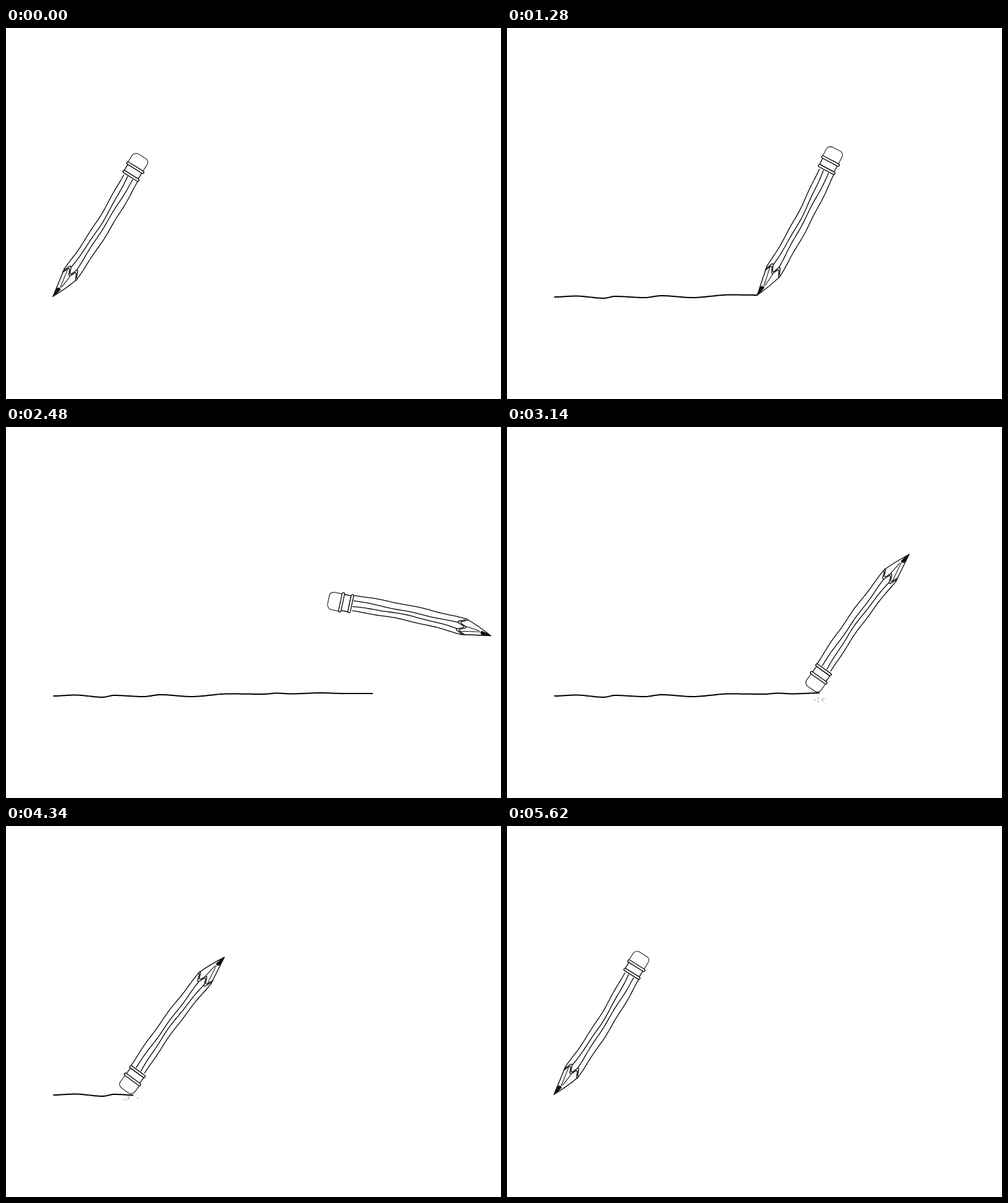
These frames come from a looping animation (800 px wide and 600 px high, 6 s). An HTML page with a canvas:

```html
<!DOCTYPE html>
<html lang="en">
<head>
<meta charset="utf-8">
<title>Pencil and eraser</title>
<style>
html, body { margin: 0; width: 100%; height: 100%; overflow: hidden; background: #fff; }
canvas { display: block; width: 800px; height: 600px; }
</style>
</head>
<body>
<canvas id="stage" width="800" height="600"></canvas>
<script>
const ctx = document.getElementById('stage').getContext('2d');
const LOOP = 6000, STEP = 20, RAD = Math.PI / 180;
const HALF = 132.4;                       // from the tip to the pencil's middle
const HOME = { x: 146.2, y: 321.7 };      // middle of the resting pencil

// Phases of the loop, in ms
const BRAKE = 1943, DRAWN = 2080;
const FLIP = 2210, FLIPPED = 2685;
const ERASE = 2790, TURN = 4823, CLEARED = 4860, DONE = 5240;

const clamp = u => Math.min(1, Math.max(0, u));
const mix = (a, b, u) => a + (b - a) * u;
const smooth = u => u * u * (3 - 2 * u);
const ease = (t, from, to) => smooth(clamp((t - from) / (to - from)));
const noise = n => {
  const v = Math.sin(n * 127.1) * 43758.5453;
  return v - Math.floor(v);
};

// --- motion: middle of the pencil and its tilt in degrees ---

// A steady stroke that brakes at its end.
function tipX(t) {
  const speed = 0.2566, d = clamp((t - BRAKE) / (DRAWN - BRAKE)) * (DRAWN - BRAKE);
  return 76 + speed * (Math.min(t, BRAKE) + d - d * d / (2 * (DRAWN - BRAKE)));
}

function drawPose(t) {
  const s = Math.min(t, DRAWN), angle = 32 - 0.0031 * s, r = angle * RAD;
  return {
    x: tipX(t) + HALF * Math.sin(r),
    y: 434 - 0.0016 * s - HALF * Math.cos(r),
    angle
  };
}

const sway = t => Math.sin(Math.PI * clamp((t - ERASE) / (TURN - ERASE)));

function erasePose(t) {
  const d = Math.min(Math.max(t, ERASE), CLEARED) - ERASE;
  return {
    x: 656.9 - 0.2394 * d - 4.8e-6 * d * d,
    y: 309 + 0.0034 * d + 7 * sway(t),
    angle: -146.4 + 4 * sway(t)
  };
}

function pose(t) {
  const a = drawPose(t), b = erasePose(t);
  if (t < ERASE) {
    const u = ease(t, FLIP, FLIPPED);
    return { x: mix(a.x, b.x, u), y: mix(a.y, b.y, u), angle: mix(a.angle, b.angle, u) };
  }
  const u = ease(t, CLEARED, DONE);
  return {
    x: mix(b.x, HOME.x, u),
    y: mix(b.y, HOME.y, u),
    angle: mix(b.angle, -328, ease(t, TURN, DONE))
  };
}

const eraserX = t => erasePose(t).x - 65 - 6 * sway(t);

// --- the pencil line, swinging between its crests and dips ---

const BENDS = [
  [77, 435], [112, 433.5], [156, 437], [175, 434], [222, 436], [250, 433],
  [300, 436], [360, 431.5], [415, 432], [438, 430.5], [460, 431.5], [510, 430],
  [545, 431], [600, 431]
];

function groundY(x) {
  const i = BENDS.findIndex(b => b[0] > x);
  const [x0, y0] = BENDS[i - 1], [x1, y1] = BENDS[i];
  return mix(y0, y1, smooth((x - x0) / (x1 - x0)));
}

function drawGround(t) {
  const end = t < ERASE ? tipX(t) : eraserX(t);
  if (end < 79) return;
  ctx.beginPath();
  for (let x = 77; x < end; x += 2) ctx.lineTo(x, groundY(x));
  ctx.lineTo(end, groundY(end));
  stroke(2);
}

// --- the pencil, tip at the origin and eraser upwards ---

const SHAFT_LOW = 46, SHAFT_HIGH = 230;

function stroke(width) {
  ctx.lineWidth = width;
  ctx.stroke();
}

// Hand-drawn lengthwise line: slight bow and tremble.
function shaftLine(x, bow, low, seed) {
  ctx.beginPath();
  for (let v = low; v <= SHAFT_HIGH; v += 4) {
    const u = (v - SHAFT_LOW) / (SHAFT_HIGH - SHAFT_LOW);
    ctx.lineTo(x + bow * Math.sin(Math.PI * u) + 0.5 * Math.sin(v / 11 + seed), -v);
  }
  stroke(1.3);
}

function scallop(base, depth) {
  ctx.beginPath();
  for (let x = -8; x <= 17.5; x += 0.5)
    ctx.lineTo(x, -base + depth * Math.cos(2 * Math.PI * (x + 8) / 12.7));
  stroke(1.3);
}

function box(left, right, low, high, radius, width) {
  ctx.beginPath();
  ctx.roundRect(left, -high, right - left, high - low, radius);
  ctx.fill();
  stroke(width);
}

function line(x0, v0, x1, v1, width) {
  ctx.beginPath();
  ctx.moveTo(x0, -v0);
  ctx.lineTo(x1, -v1);
  stroke(width);
}

function drawPencil(t) {
  const p = pose(t);
  ctx.save();
  ctx.translate(p.x, p.y);
  ctx.rotate(p.angle * RAD);
  ctx.translate(0, HALF);

  ctx.fillStyle = '#fff';
  ctx.fill(new Path2D('M0 0L-8 -47L-8 -230H18L18 -42Z'));
  shaftLine(-7.8, 3.6, 47, 0);
  shaftLine(-0.8, 5, 56, 1);
  shaftLine(9.4, 0.8, 56, 2);
  shaftLine(18, 2.4, 42, 3);

  scallop(51, 5.5);
  scallop(47, 5);
  ctx.stroke(new Path2D('M-8 -47Q-5 -30 0 0Q12 -24 17.6 -42'));
  line(-3, 49, 2.5, 18, 1);
  line(6.3, 42, 4, 20, 1);
  ctx.fillStyle = '#111';
  ctx.fill(new Path2D('M-0.5 1L-2 -14Q0 -19 4.8 -16Q3 -6 0.5 1Z'));

  ctx.fillStyle = '#fff';
  box(-12.5, 16, 247, 268.5, [8, 7, 2, 2], 1);
  box(-10.5, 16, 234, 246, 1, 1.3);
  box(-11.5, 18.5, 230, 234, 2, 1.3);
  box(-13.5, 18.5, 245, 249, 2, 1.3);
  ctx.restore();
}

// Rubbings that tumble along beside the eraser.
function drawCrumbs(t) {
  if (t < 2900 || t > 4700) return;
  ctx.fillStyle = '#555';
  for (let i = 0; i < 6; i++) {
    const age = t / 260 + i / 6, cycle = Math.floor(age) * 6 + i;
    ctx.fillRect(eraserX(t) - 20 + 32 * noise(cycle + 1), 437 + 7 * (age % 1), 1.3, 1.3);
  }
}

function frame(now) {
  const t = Math.floor((now % LOOP) / STEP) * STEP;
  ctx.fillStyle = '#fff';
  ctx.fillRect(0, 0, 800, 600);
  ctx.strokeStyle = '#000';
  ctx.lineCap = ctx.lineJoin = 'round';
  drawGround(t);
  drawPencil(t);
  drawCrumbs(t);
}

const start = performance.now();
function tick() {
  frame(Math.max(0, performance.now() - start));
  requestAnimationFrame(tick);
}
tick();
</script>
</body>
</html>
```
